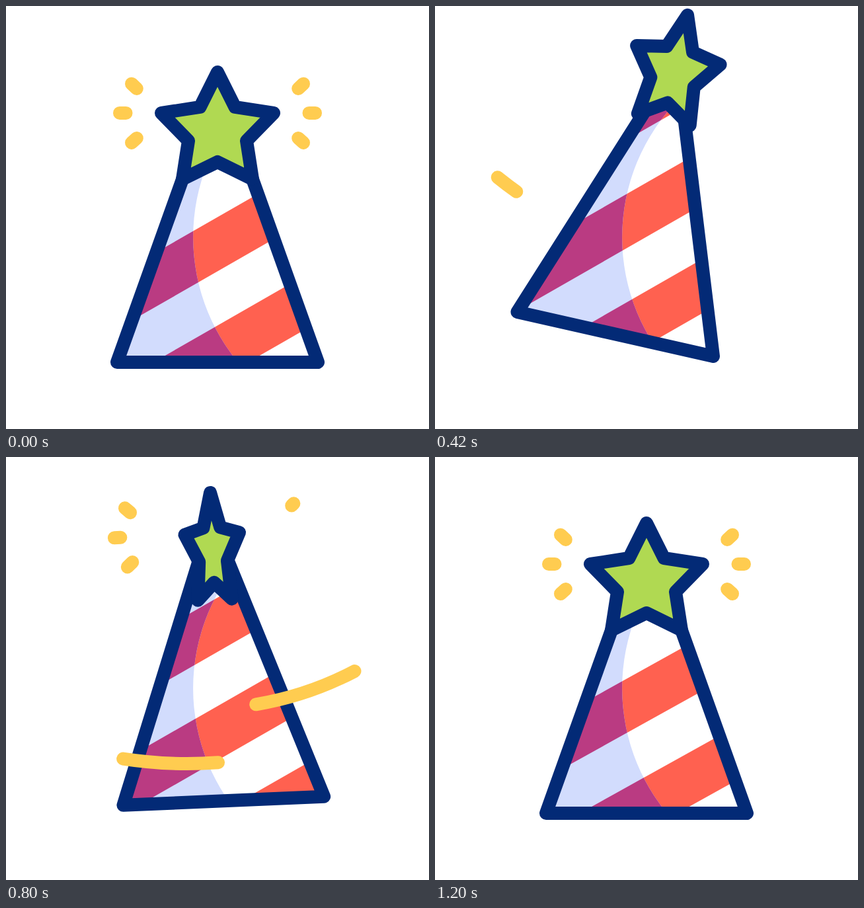
These frames come from a looping animation (640x640 px, 1820 ms). An HTML page:

```html
<!DOCTYPE html>
<html lang="en">
<head>
<meta charset="utf-8">
<title>Party hat</title>
<style>
  html, body { margin: 0; width: 100%; height: 100%; overflow: hidden; background: #fff; }
  svg { display: block; width: 100vw; height: 100vh; }
  .line { fill: none; stroke: #032a76; stroke-width: 20; stroke-linecap: round; stroke-linejoin: round; }
  .glow { fill: none; stroke: #ffcc50; stroke-width: 20; stroke-linecap: round; }
</style>
</head>
<body>
<svg viewBox="0 0 640 640">
  <defs>
    <clipPath id="cone"><polygon id="coneShape"/></clipPath>
    <clipPath id="shade"><path d="M0 0H580V53A297 297 0 0 0 580 647H0Z"/></clipPath>
  </defs>
  <g clip-path="url(#cone)">
    <rect width="640" height="640" fill="#fff"/>
    <path class="stripes" fill="#ff6150"/>
    <g clip-path="url(#shade)">
      <rect width="640" height="640" fill="#d2dcfd"/>
      <path class="stripes" fill="#ba3b82"/>
    </g>
  </g>
  <g id="hat">
    <polygon class="line" points="168,539 320,114 472,539"/>
    <g id="top">
      <polygon id="star" class="line" style="fill:#b0d952"/>
      <g id="sparks"></g>
    </g>
    <path id="trailA" class="glow"/>
    <path id="trailB" class="glow"/>
  </g>
</svg>
<script>
const LOOP = 1820;
const PIVOT = 325;
const CONE = [[168, 539], [320, 114], [472, 539]];
const HALF_STAR = [[0, 100], [26.5, 153], [85, 162], [44, 204], [53, 262]];
// inner end, outer end, as offsets from the axis
const SPARKS = [
  [122.2, 125, 130, 117.7],
  [138.5, 162, 148, 162],
  [122.2, 200, 130, 207]
];
const TILT = [[0, 0], [400, 13.1], [663, -5.75], [960, 1.55], [1100, -1.6], [1200, 0]];
const SPIN = [[0, 1], [400, 0.755], [603, 1], [1200, -1]];

const $ = id => document.getElementById(id);
const ease = (t, a, b) => {
  const p = Math.min(1, Math.max(0, (t - a) / (b - a)));
  return p * p * (3 - 2 * p);
};
const mix = (a, b, p) => a + (b - a) * p;
const track = (keys, t) => {
  let v = keys[0][1];
  for (let i = 1; i < keys.length; i++) {
    v += (keys[i][1] - keys[i - 1][1]) * ease(t, keys[i - 1][0], keys[i][0]);
  }
  return v;
};
// Upward swing that is already under way at time zero
const LEAD = ease(0, -30, 455);
const swing = t => (ease(t, -30, 455) - LEAD) / (1 - LEAD);

const sparks = [-1, 1].flatMap(side => SPARKS.map(([x1, y1, x2, y2]) => {
  const el = document.createElementNS("http://www.w3.org/2000/svg", "line");
  el.setAttribute("class", "glow");
  $("sparks").append(el);
  return { el, x1: 320 + side * x1, y1, x2: 320 + side * x2, y2 };
}));

function drawSpark(s, i, t) {
  const from = ease(t, 20 + 60 * i, 100 + 60 * i);
  const back = ease(t, 615 + 50 * i, 695 + 50 * i);
  const a = back > 0 ? 0 : from;
  const b = back > 0 ? back : 1;
  s.el.style.display = a < 1 ? "" : "none";
  s.el.setAttribute("x1", mix(s.x1, s.x2, a));
  s.el.setAttribute("y1", mix(s.y1, s.y2, a));
  s.el.setAttribute("x2", mix(s.x1, s.x2, b));
  s.el.setAttribute("y2", mix(s.y1, s.y2, b));
}

// Shallow arc hanging in front of the cone, shown between tail and head
function drawTrail(id, cx, low, r, left, right, tail, head) {
  const at = p => {
    const x = mix(left, right, p);
    return [x, low - r + Math.sqrt(r * r - (x - cx) ** 2)];
  };
  $(id).setAttribute("d", head - tail < 0.001 ? "" :
    `M${at(tail)}A${r} ${r} 0 0 0 ${at(head)}`);
}

function stripes(shift, slope) {
  let d = "";
  for (let y = 319.5 + shift - 164 * 4; y < 1000; y += 164) {
    const l = y + 320 * slope, r = y - 320 * slope;
    d += `M0 ${l}L640 ${r}V${r + 82}L0 ${l + 82}Z`;
  }
  return d;
}

function render(t) {
  const rise = swing(t), fall = ease(t, 450, 1143);
  const hop = rise - fall;
  const lift = -37.8 * hop;
  const deg = track(TILT, t);
  const a = deg * Math.PI / 180, c = Math.cos(a), s = Math.sin(a);

  $("coneShape").setAttribute("points", CONE.map(([x, y]) => {
    const dx = x - 320, dy = y - PIVOT;
    return [320 + dx * c - dy * s, PIVOT + lift + dx * s + dy * c];
  }).join(" "));
  $("hat").setAttribute("transform", `translate(0 ${lift}) rotate(${deg} 320 ${PIVOT})`);
  $("top").setAttribute("transform", `translate(0 ${-56.7 * hop})`);

  const k = track(SPIN, t);
  const right = HALF_STAR.map(([x, y]) => [320 + x * k, y]);
  const mirror = HALF_STAR.slice(1).reverse().map(([x, y]) => [320 - x * k, y]);
  $("star").setAttribute("points", [...right, [320, 236], ...mirror].join(" "));

  const slope = mix(0.573, 0.556, ease(t, 960, 1200));
  const d = stripes(-53 * rise + 216.4 * fall, slope);
  document.querySelectorAll(".stripes").forEach(el => el.setAttribute("d", d));

  sparks.forEach((sp, i) => drawSpark(sp, i, t));
  drawTrail("trailA", 315, 399, 495, 94, 537, ease(t, 528, 990), ease(t, 336, 848));
  drawTrail("trailB", 295, 481, 640, 94, 399, ease(t, 646, 1119), ease(t, 455, 985));
}

const start = performance.now();
function tick(now) {
  render(Math.max(0, now - start) % LOOP);
  requestAnimationFrame(tick);
}
render(0);
requestAnimationFrame(tick);
</script>
</body>
</html>
```
